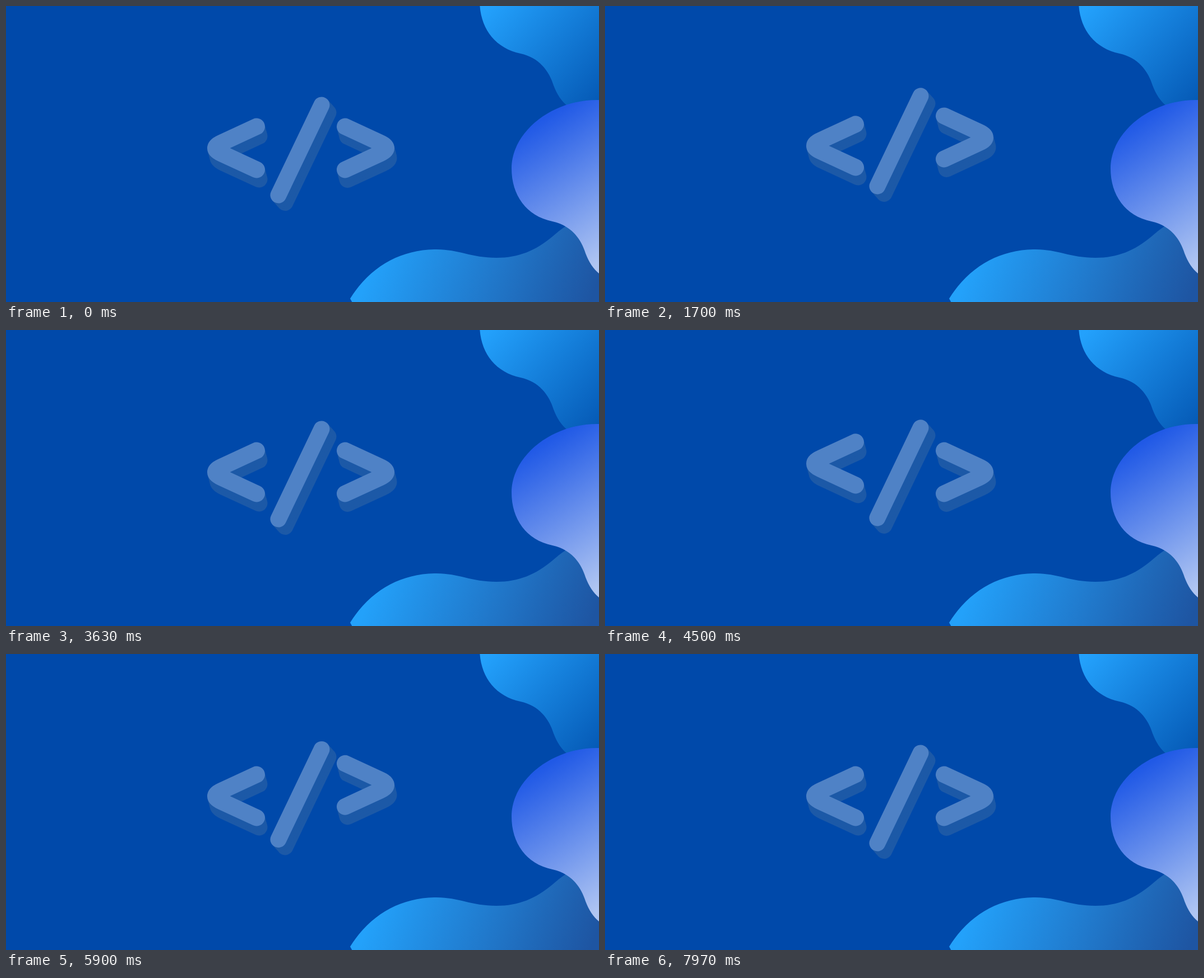
An HTML page for the animation above (8010 ms loop, 1058 px wide and 529 px high).

```html
<!DOCTYPE html>
<html lang="en">
<head>
<meta charset="utf-8">
<title>Code</title>
<style>
  html, body { margin: 0; width: 100%; height: 100%; overflow: hidden; background: #0049aa; }
  svg { display: block; width: 100%; height: 100%; }
  .glyph { fill: none; stroke-linecap: round; stroke-linejoin: round; }
  .side { stroke: #1c59a7; }
  .face { stroke: #4f82c6; }
</style>
</head>
<body>
<svg viewBox="0 0 1058 529">
  <defs>
    <linearGradient id="sky" gradientUnits="userSpaceOnUse" x1="918" y1="300" x2="1112" y2="476">
      <stop offset="0" stop-color="#23a1fc"/>
      <stop offset="1" stop-color="#0559b5"/>
    </linearGradient>
    <linearGradient id="mist" gradientUnits="userSpaceOnUse" x1="922" y1="225" x2="1068" y2="455">
      <stop offset="0" stop-color="#2059e6"/>
      <stop offset="1" stop-color="#b0c6f2"/>
    </linearGradient>
    <linearGradient id="sea" gradientUnits="userSpaceOnUse" x1="670" y1="420" x2="1030" y2="560">
      <stop offset="0" stop-color="#23a1fa"/>
      <stop offset="1" stop-color="#1e55a2"/>
    </linearGradient>
    <path id="blob" d="M1160 168H1058C975 166 902 225 902 290C902 338 928 375 975 385
      C1008 392 1026 416 1034 442C1040 458 1048 470 1058 478L1160 520Z"/>
  </defs>
  <rect width="1058" height="529" fill="#0049aa"/>
  <use href="#blob" fill="url(#sky)" transform="translate(-57 -300)"/>
  <path fill="url(#sea)" d="M618 530L614 523C650 465 705 435 768 435C808 435 830 450 875 450
    C915 450 945 437 975 412C983 405 990 399 998 394H1060V530Z"/>
  <use href="#blob" fill="url(#mist)"/>
  <g id="glyphs"></g>
</svg>
<script>
const LOOP = 8010, HOP = 2000, HEIGHT = 20;

// depth: offset of the extruded side; starts: when each hop begins
const glyphs = [
  { d: 'M447 215.5L384.5 244.5Q363.5 254 384.5 263.5L447 292.5', width: 30, depth: [4.5, 17], starts: [0, 3830] },
  { d: 'M563 177L486 338', width: 29, depth: [12, 13.5], starts: [410, 4290] },
  { d: 'M605 215.5L667.5 244.5Q688.5 254 667.5 263.5L605 292.5', width: 30, depth: [4.5, 17.5], starts: [840, 4830] }
];

const root = document.getElementById('glyphs');

function add(parent, tag, attrs) {
  const node = document.createElementNS('http://www.w3.org/2000/svg', tag);
  for (const key in attrs) node.setAttribute(key, attrs[key]);
  return parent.appendChild(node);
}

for (const g of glyphs) {
  g.node = add(root, 'g', { class: 'glyph', 'stroke-width': g.width });
  for (let k = 1; k >= 0; k -= 0.25) {
    add(g.node, 'path', {
      d: g.d,
      class: k ? 'side' : 'face',
      transform: `translate(${g.depth[0] * k} ${g.depth[1] * k})`
    });
  }
}

function lift(t, starts) {
  const start = starts.find(s => t >= s && t < s + HOP);
  if (start === undefined) return 0;
  return HEIGHT * (1 - Math.cos((t - start) / HOP * 2 * Math.PI)) / 2;
}

function draw(t) {
  for (const g of glyphs) {
    g.node.setAttribute('transform', `translate(0 ${-lift(t, g.starts).toFixed(2)})`);
  }
}

function tick() {
  draw(performance.now() % LOOP);
  requestAnimationFrame(tick);
}
tick();
</script>
</body>
</html>
```
